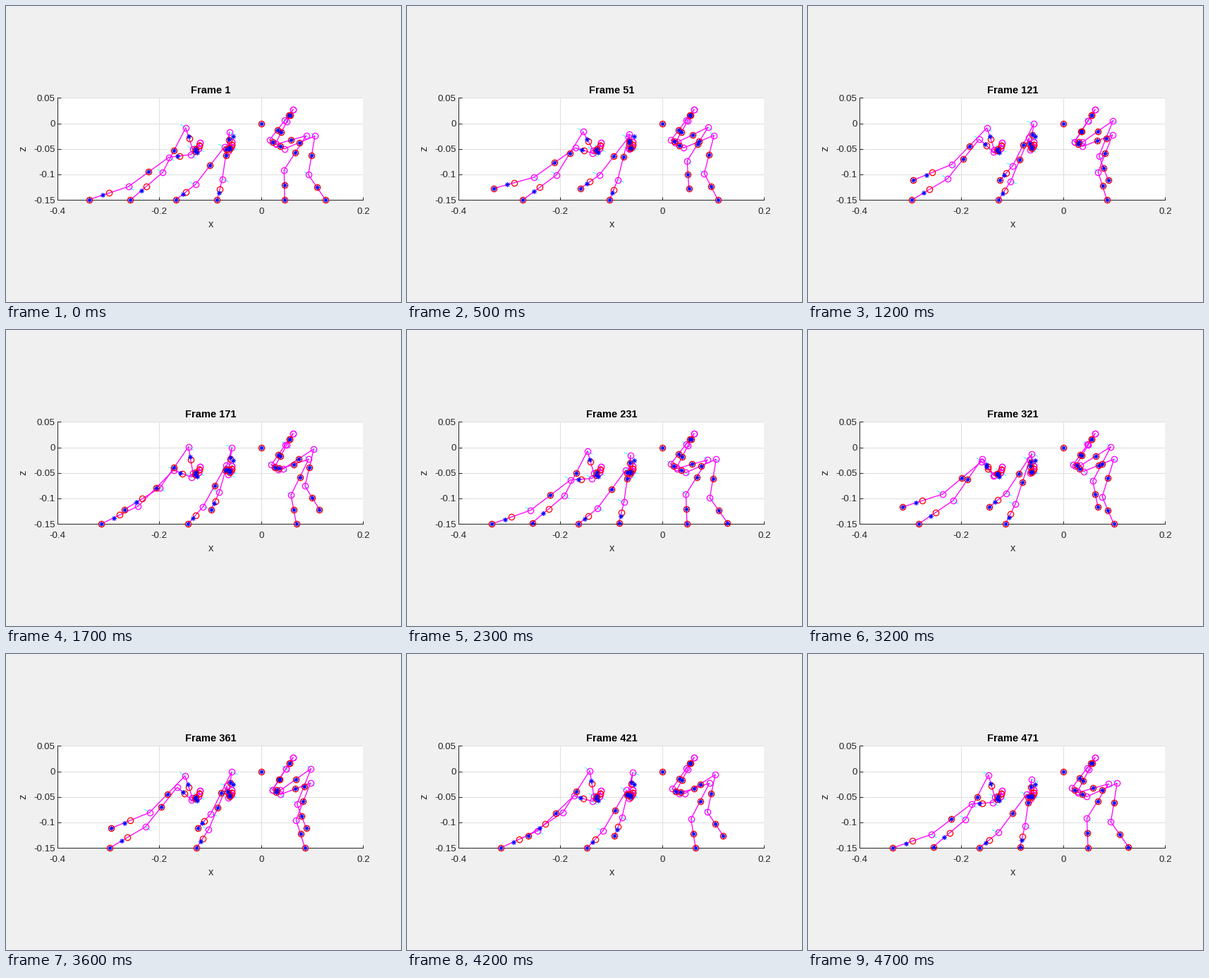
Recreate the animation shown at these times as a matplotlib script. Size 560 by 420 pixels, loop 4800 ms.

```python
import numpy as np
import matplotlib.pyplot as plt
from matplotlib.animation import FuncAnimation

W, H, DPI = 560, 420, 80
FRAMES, INTERVAL = 48, 100
PT = 72 / DPI                       # points per pixel
FONT, INK = "Liberation Sans", "#262626"


def joint(rest, reach=(0, 0), lift=(0, 0), sag=0):
    """Joint response in mm: fore-aft stroke, foot lift, droop at both ends."""
    return np.array([rest, reach, lift, (0, sag)], float)


class Leg:
    def __init__(self, joints, axis, side, mass):
        self.joints = np.array(joints)
        self.axis = np.array(axis) * side
        self.mass = mass            # mass position along the last links

    def pose(self, phase):
        stroke, lift = gait(phase)
        return np.tensordot([1, stroke, lift, stroke ** 2], self.joints, (0, 1))


def gait(phase):
    """Stroke (-1 rear, 1 fore) and lift (0 to 1): half swing, half stance."""
    u = 2 * phase % 2
    if u >= 1:
        return 3 - 2 * u, 0
    a = 2 * np.pi * u
    return 2 * u - 1 - .27 * np.sin(a) - .07 * np.sin(2 * a), np.sin(a / 2) ** 1.2


def foot(x):
    return joint((x, -150), (40.5, 0), (0, 38.5))


HIND = Leg([joint((-120.3, -38)),
            joint((-122.5, -48.8)),
            joint((-136.4, -56), (2, 5.2), (1.4, 3.7)),
            joint((-164.5, -30.4), (16.7, 29), (14.2, 20.6), -7),
            joint((-226.5, -108.5), (33.9, 14.2), (6.2, 27.4), -1.7),
            foot(-296)], (9.7, -6.5), 1, [.62, .5, .66])
MIDDLE = Leg([joint((-57.4, -36.6)),
              joint((-59.5, -46.3)),
              joint((-64.7, -51.4), (.6, 3.3), (1.1, 6.1)),
              joint((-67.4, -28.3), (4.8, 14.5), (9.1, 26.7), -3.5),
              joint((-102.4, -113.4), (26.6, 5.5), (2.6, 30.4), -1.4),
              foot(-126)], (11.8, -4.8), -1, [.55, .5, .66])
FRONT = Leg([joint((62.2, 27)),
             joint((48.5, 5.1), (2, -1.2)),
             joint((22.3, -36), (5.9, -3.6)),
             joint((37.3, -45.6), (8.6, -4.4), (.4, 9.1)),
             joint((96.8, -22.8), (8.6, 0), (.6, 28.3), -2),
             joint((69, -95.4), (24, -4.5), (.4, 31.9), -1),
             foot(86.7)], (7, -5.5), 1, [.5] * 5)
# each leg and its mirror twin half a cycle later
WALK = [(leg, shift, sign) for shift, sign in ((0, 1), (.5, -1))
        for leg in (HIND, MIDDLE, FRONT)]
BODY = [(0, 0), (-54.6, -25.6), (-125.1, -57.4)]

plt.rcParams["font.family"] = FONT
fig = plt.figure(figsize=(W / DPI, H / DPI), dpi=DPI, facecolor="#f0f0f0")
ax = fig.add_axes([72.8 / W, 144.9 / H, 433.6 / W, 144.7 / H])
ax.set(xlim=(-.4, .2), ylim=(-.15, .05))
for set_ticks, ticks in ((ax.set_xticks, [-.4, -.2, 0, .2]),
                         (ax.set_yticks, [-.15, -.1, -.05, 0, .05])):
    set_ticks(ticks, [f"{v:g}" for v in ticks])
ax.tick_params(direction="in", length=4.5 * PT, width=PT, color=INK,
               labelcolor=INK, labelsize=13.33 * PT)
ax.tick_params(axis="x", pad=11 * PT)
ax.tick_params(axis="y", pad=3.3 * PT)
ax.grid(color="#dedede", lw=PT)
ax.set_axisbelow(True)
for name, spine in ax.spines.items():
    spine.set(visible=name in ("left", "bottom"), color=INK, linewidth=PT)


def label(x, y, s, **kw):
    return fig.text(x / W, 1 - y / H, s, fontsize=14.67 * PT, ha="center",
                    **{"color": INK, "va": "baseline", **kw})


label(290.3, 314.5, "x")
label(24.5, 202, "z", rotation=90, va="center")
title = label(290.3, 123.5, "", color="black", weight="bold")


def plot(color, width, z, marker=None, size=8.3, edge=1.3):
    return ax.plot([], [], color=color, lw=width * PT, marker=marker, ms=size * PT,
                   mfc="none", mew=edge * PT, zorder=z, clip_on=False)[0]


pins = plot("cyan", .8, 2)
bones = [plot("magenta", 1.3, 3, "o") for _ in WALK]
centers = plot("red", 0, 4, "o")
masses = plot("blue", 0, 5, (8, 2, 0), 7, .9)


def show(line, points):
    line.set_data(*np.array(points).T / 1000)


def draw(n):
    title.set_text(f"Frame {10 * n + 1}")
    mids, stars, axes = [BODY[0]], list(BODY), []
    for line, (leg, shift, sign) in zip(bones, WALK):
        p = leg.pose((n + .3) / FRAMES + shift)
        show(line, p)
        line.set_markevery(list(range(len(p) - 1)))     # no ring on the foot
        mids += [*(p[:-1] + p[1:]) / 2, p[-1]]
        # the first hind and middle link has its mass in the body
        k = [.5] * (4 - len(leg.mass)) + leg.mass
        a, b = p[:-1][-len(k):], p[1:][-len(k):]
        stars += [*(a + (b - a) * np.array(k)[:, None]), p[-1]]
        if leg is FRONT:
            stars.append((p[0] + p[1]) / 2)
        for q in p[1:-1]:
            axes += [q, q + sign * leg.axis, (np.nan, np.nan)]
    for line, points in ((centers, mids), (masses, stars), (pins, axes)):
        show(line, points)
    return [title, pins, centers, masses, *bones]


anim = FuncAnimation(fig, draw, frames=FRAMES, interval=INTERVAL,
                     repeat=True, repeat_delay=0)
plt.show()
```
